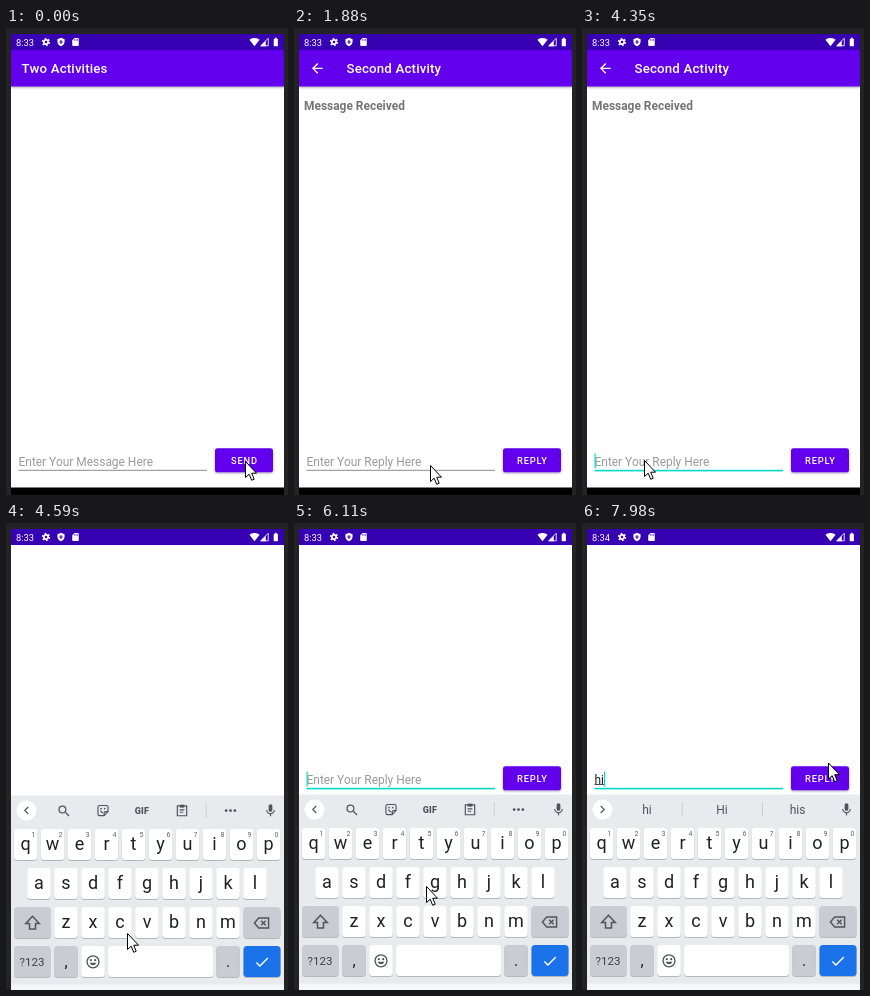
An HTML page for the animation above (8 s loop, 282 by 467 pixels).

```html
<!DOCTYPE html>
<html lang="en">
<head>
<meta charset="utf-8">
<title>Two Activities</title>
<style>
html, body { margin: 0; width: 100%; height: 100%; overflow: hidden; background: #232323; }
svg { display: block; width: 282px; height: 467px; }
text { font-family: Roboto, sans-serif; white-space: pre; }
.title { font-size: 13.28px; font-weight: 500; letter-spacing: .0125em; fill: #fff; }
.clock { font-size: 9.3px; fill: #fff; }
.field { font-size: 11.95px; }
.btn { font-size: 9.3px; font-weight: 500; letter-spacing: .0893em; fill: #fff; text-anchor: middle; }
.head { font-size: 11.95px; font-weight: 700; fill: #757575; }
.key { font-size: 18px; fill: #202124; text-anchor: middle; }
.num { font-size: 7px; fill: #5f6368; text-anchor: middle; }
.sym { font-size: 11.5px; fill: #3c4043; text-anchor: middle; }
.word { font-size: 12px; fill: #50545a; text-anchor: middle; }
.line { fill: none; stroke: #50545a; stroke-width: 2; }
</style>
</head>
<body>
<svg id="stage" viewBox="0 0 282 467"></svg>
<script>
const LOOP = 8000, PAN = 177;
const stage = document.getElementById("stage");

const rect = (x, y, w, h, fill, more = "") =>
  `<rect x="${x}" y="${y}" width="${w}" height="${h}" fill="${fill}" ${more}/>`;
const text = (x, y, cls, s, more = "") =>
  `<text x="${x}" y="${y}" class="${cls}" ${more}>${s}</text>`;
// Icon on a 24-unit grid, centred at x, y
const icon = (x, y, size, body, fill = "#50545a") =>
  `<g transform="translate(${x - size / 2} ${y - size / 2}) scale(${size / 24})" fill="${fill}">${body}</g>`;
const path = (d, more = "") => `<path d="${d}" ${more}/>`;

const shapes = {
  back: path("M20 11H7.83l5.59-5.59L12 4l-8 8 8 8 1.41-1.41L7.83 13H20z"),
  gear: `<circle cx="12" cy="12" r="5.4" fill="none" stroke="#fff" stroke-width="4.4"/>
    <circle cx="12" cy="12" r="8.8" fill="none" stroke="#fff" stroke-width="3.6" stroke-dasharray="4.4 4.815"/>`,
  shield: path("M12 1 3 5v6c0 5.55 3.84 10.74 9 12 5.16-1.26 9-6.45 9-12V5z") +
    path("M12 7v10M7.5 12h9", 'stroke="#3700b3" stroke-width="2.6"'),
  card: path("M18 2h-8L4 8v12c0 1.1.9 2 2 2h12c1.1 0 2-.9 2-2V4c0-1.1-.9-2-2-2z") +
    path("M10 5v4M13.5 5v4M17 5v4", 'stroke="#3700b3" stroke-width="1.6"'),
  wifi: path("M12 21.5.4 7C1 6.5 5 3 12 3s11 3.500 11.6 4z"),
  signal: path("M3 21h18V3z", 'fill="none" stroke="#fff" stroke-width="2"') + path("M2 22h13V9z"),
  battery: path("M15.7 4H14V2h-4v2H8.300C7.600 4 7 4.600 7 5.300v15.400C7 21.400 7.600 22 8.300 22h7.400c.7 0 1.300-.6 1.300-1.300V5.300C17 4.600 16.400 4 15.700 4z"),
  search: path("M14.5 14.500 20 20", 'class="line"') + '<circle cx="9.500" cy="9.500" r="5.500" class="line"/>',
  sticker: path("M14 21H6a3 3 0 0 1-3-3V6a3 3 0 0 1 3-3h12a3 3 0 0 1 3 3v8zv-4a3 3 0 0 1 3-3h4M7.500 12c1 3 3 4 5 4", 'class="line"') +
    '<circle cx="8.500" cy="8.500" r="1.500"/><circle cx="15" cy="8.500" r="1.500"/>',
  clip: path("M4 4h16v17H4zM8 11h8M8 15h6", 'class="line"') + path("M8 2h8v5H8z"),
  dots: '<circle cx="5" cy="12" r="2.200"/><circle cx="12" cy="12" r="2.200"/><circle cx="19" cy="12" r="2.200"/>',
  mic: path("M12 14c1.660 0 3-1.340 3-3V5c0-1.660-1.340-3-3-3S9 3.340 9 5v6c0 1.660 1.340 3 3 3zm5.300-3c0 3-2.540 5.100-5.300 5.100S6.700 14 6.700 11H5c0 3.410 2.720 6.230 6 6.720V21h2v-3.280c3.280-.48 6-3.300 6-6.720z"),
  smile: '<circle cx="12" cy="12" r="9" class="line"/><circle cx="8.700" cy="9.500" r="1.600"/><circle cx="15.300" cy="9.500" r="1.600"/>' +
    path("M7 13.500c2 5 8 5 10 0z"),
  shift: path("M12 3 3 12.500h5V20h8v-7.500h5z", 'class="line"'),
  erase: path("M8 5h14v14H8L2 12zM11.500 8.800l6.400 6.400M17.900 8.800l-6.400 6.400", 'class="line"'),
  check: path("M9 16.200 4.800 12l-1.400 1.400L9 19 21 7l-1.400-1.400z"),
  left: path("M15 6l-6 6 6 6", 'class="line"'),
  right: path("M9 6l6 6-6 6", 'class="line"')
};

function screen(id, title, titleX, hint, label, extra) {
  return `<g id="${id}">
    ${rect(5, 22, 273, 438, "#fff")}
    ${rect(5, 22, 273, 36.5, "#6200ee", 'filter="url(#low)"')}
    ${text(titleX, 45.3, "title", title)}${extra}
    <g id="${id}Form">
      <text id="${id}Text" x="12.5" y="438" class="field" fill="#9a9a9a">${hint}</text>
      ${rect(12.500, 441.8, 188.5, 1, "#8c8c8c", `id="${id}Line"`)}
      ${rect(12.500, 425.500, 1.2, 15, "#03dac5", `id="${id}Caret" visibility="hidden"`)}
      ${rect(12.500, 438.200, 9.500, .8, "#222", `id="${id}Under" visibility="hidden"`)}
      ${rect(209, 420.300, 58, 24, "#6200ee", `id="${id}Btn" rx="2.600" filter="url(#low)"`)}
      ${text(238.400, 435.800, "btn", label)}
    </g></g>`;
}

function cap(x, y, w, fill = "#fff") {
  return rect(x, y + 1, w, 31, "#b4b7bc", 'rx="3.500"') + rect(x, y, w, 31, fill, 'rx="3.500"');
}

function row(letters, x0, y, digits) {
  return [...letters].map((c, i) => {
    const x = x0 + 27 * i;
    return cap(x - 11.8, y, 23.600) + text(x, y + 20.600, "key", c) +
      (digits ? text(x + 8, y + 8.300, "num", (i + 1) % 10) : "");
  }).join("");
}

function keyboard() {
  const dark = "#c9cdd3", divider = x => rect(x, 279, .8, 15, "#c6c9cd");
  return `<g id="board">
    ${rect(5, 271.500, 273, 196, "#e8eaed")}
    ${rect(5, 460.500, 273, 7, "#f5f6f7")}
    <circle cx="20.500" cy="286.500" r="10" fill="#fff"/>
    <g id="tools">${icon(20.500, 286.500, 14, shapes.left)}
      ${icon(58, 287, 15, shapes.search)}${icon(97, 286.500, 13.500, shapes.sticker)}
      ${text(136, 289.800, "word", "GIF", 'style="font-size:9px;font-weight:900;letter-spacing:.3px"')}
      ${icon(176, 286.500, 14, shapes.clip)}${divider(199.800)}${icon(224.500, 286.500, 15, shapes.dots)}</g>
    <g id="words" visibility="hidden">${icon(20.500, 286.500, 14, shapes.right)}
      ${divider(99.800)}${divider(180)}
      ${[65, 140, 215.500].map((x, i) => text(x, 290.500, "word", "", `id="word${i}"`)).join("")}</g>
    ${icon(264.500, 286.500, 15, shapes.mic)}
    ${row("qwertyuiop", 19.500, 305, true)}
    ${row("asdfghjkl", 33, 344)}
    ${row("zxcvbnm", 60, 383)}
    ${cap(8, 383, 37, dark)}${icon(26.500, 399, 18, shapes.shift)}
    ${cap(237.500, 383, 37, dark)}${icon(255.500, 399, 17, shapes.erase)}
    ${cap(8, 422, 36.500, dark)}${text(26, 442, "sym", "?123")}
    ${cap(48.200, 422, 23.600, dark)}${text(60, 443, "key", ",", 'style="font-size:16px"')}
    ${cap(75.200, 422, 23.600)}${icon(87, 437.800, 16, shapes.smile)}
    ${cap(102, 422, 105)}
    ${cap(210.200, 422, 23.600, dark)}${text(222, 443, "key", ".", 'style="font-size:16px"')}
    ${cap(237.500, 422, 37, "#1a73e8")}${icon(256, 438, 17, shapes.check, "#fff")}
  </g>`;
}

stage.innerHTML = `
  <defs>
    <filter id="low" x="-20%" y="-30%" width="140%" height="190%">
      <feDropShadow dx="0" dy="1" stdDeviation=".9" flood-opacity=".35"/></filter>
    <filter id="high" x="-20%" y="-30%" width="140%" height="190%">
      <feDropShadow dx="0" dy="2.500" stdDeviation="1.600" flood-opacity=".4"/></filter>
    <clipPath id="glass"><rect x="5" y="6" width="273" height="461"/></clipPath>
  </defs>
  ${rect(0, 0, 282, 467, "#232323")}
  <g clip-path="url(#glass)">
    ${rect(5, 6, 273, 461, "#fff")}
    ${screen("main", "Two Activities", 15.500, "Enter Your Message Here", "SEND", "")}
    ${screen("second", "Second Activity", 52.500, "Enter Your Reply Here", "REPLY",
      icon(23.300, 40.300, 16, shapes.back, "#fff") + text(10, 82, "head", "Message Received"))}
    ${rect(5, 459.500, 273, 8, "#000")}
    ${keyboard()}
    ${rect(5, 6, 273, 16, "#3700b3")}
    ${text(10, 17.500, "clock", "8:33", 'id="clock"')}
    ${icon(40, 14, 9.500, shapes.gear, "#fff")}${icon(55, 14, 9.500, shapes.shield, "#fff")}
    ${icon(69.500, 14, 9.800, shapes.card, "#fff")}${icon(248.500, 14, 10.500, shapes.wifi, "#fff")}
    ${icon(258.500, 14, 10, shapes.signal, "#fff")}${icon(269.800, 14, 10, shapes.battery, "#fff")}
  </g>
  <path id="mouse" d="M.5.5V16.500L4.200 13.200 6.700 19.300 9.200 18.200 6.700 12.200H11.500z" fill="#fff" stroke="#000"/>`;

const $ = Object.fromEntries([...stage.querySelectorAll("[id]")].map(e => [e.id, e]));
const set = (e, name, v) => e.setAttribute(name, v);
const show = (e, on) => set(e, "visibility", on ? "inherit" : "hidden");
const move = (e, x, y) => set(e, "transform", `translate(${x} ${y})`);

// Screen refreshes: first time, last time, count
const bursts = [[0, 0, 1], [150, 290, 2], [610, 610, 1], [880, 1420, 5], [1580, 1880, 3],
  [2020, 2430, 4], [2960, 3780, 7], [4050, 4350, 3], [4470, 4590, 2], [4730, 5010, 3],
  [5160, 6110, 8], [6250, 6560, 3], [6840, 7830, 8], [7980, 7980, 1]];
const ticks = bursts.flatMap(([a, b, n]) =>
  Array.from({ length: n }, (_, i) => n > 1 ? a + (b - a) * i / (n - 1) : a));

// Pointer path: time, x, y
const trail = [[0, 239, 433], [150, 239, 432], [290, 239, 433], [880, 237, 434], [1420, 156, 446],
  [1880, 136, 437], [2430, 92, 424], [2960, 98, 424], [3230, 127, 420], [3780, 75, 418],
  [4200, 62, 432], [4350, 62, 432], [4590, 121, 410], [5010, 122, 436], [5300, 124, 433],
  [6110, 132, 363], [6560, 166, 361], [6840, 166, 361], [7265, 207, 322], [7400, 207, 322],
  [7830, 211, 239], [7980, 246, 239.500]];

function pointer(t) {
  const i = trail.findIndex(p => p[0] > t);
  if (i < 0) return trail[trail.length - 1].slice(1);
  const [a, x, y] = trail[i - 1], [b, u, v] = trail[i], k = (t - a) / (b - a);
  return [Math.round(x + (u - x) * k), Math.round((y + (v - y) * k) * 2) / 2];
}

function draw(now) {
  const t = ticks.filter(s => s <= now + .5).pop();

  const pressed = t >= 610 && t < 1000;
  set($.mainBtn, "fill", pressed ? "#8133f1" : "#6200ee");
  set($.mainBtn, "filter", pressed ? "url(#high)" : "url(#low)");

  const open = Math.max(0, Math.min(1, (t - 1480) / 380)), ease = 1 - (1 - open) ** 3;
  const panned = t >= 4590;
  set($.second, "opacity", ease);
  move($.second, 0, panned ? -PAN : 18 * (1 - ease));
  show($.main, t < 1880);
  show($.secondForm, !panned || t >= 4730);

  const focus = t >= 4200, typed = t >= 7400 ? "hi" : t >= 6840 ? "h" : "";
  set($.secondLine, "fill", focus ? "#03dac5" : "#8c8c8c");
  set($.secondLine, "height", focus ? 1.600 : 1);
  $.secondText.textContent = typed || "Enter Your Reply Here";
  set($.secondText, "fill", typed ? "#222" : "#9a9a9a");
  const width = typed ? $.secondText.getComputedTextLength() : 0;
  show($.secondUnder, typed);
  set($.secondUnder, "width", width);
  set($.secondCaret, "x", 12.500 + width);
  show($.secondCaret, focus && (typed || (t - 4050) % 1000 < 500));

  show($.board, t >= 4470);
  move($.board, 0, t < 4590 ? 60 : t < 4730 ? 1 : 0);
  show($.tools, !typed);
  show($.words, typed);
  (typed === "hi" ? ["hi", "Hi", "his"] : ["h", "he", "hi"])
    .forEach((w, i) => { $["word" + i].textContent = w; });

  $.clock.textContent = t >= 7200 ? "8:34" : "8:33";
  move($.mouse, ...pointer(t));
}

const start = performance.now();
function tick() {
  draw((performance.now() - start) % LOOP);
  requestAnimationFrame(tick);
}
tick();
</script>
</body>
</html>
```
